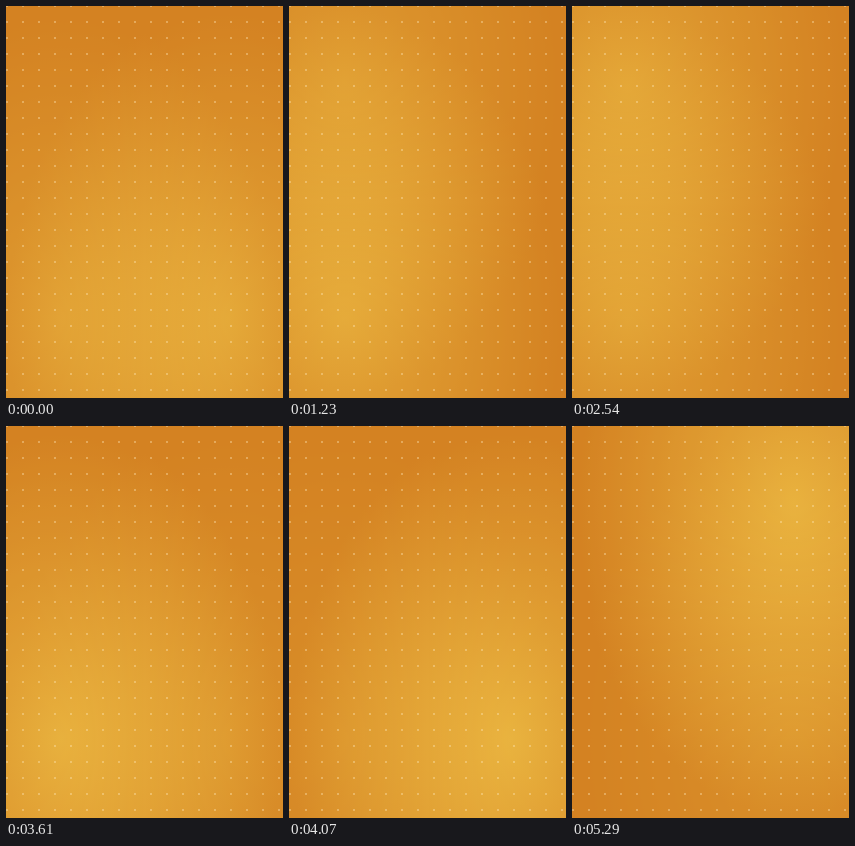
Animation, 277 px wide and 392 px high, one loop 5650 ms. Source, as an HTML page with a canvas:

```html
<!DOCTYPE html>
<html lang="en">
<head>
<meta charset="utf-8">
<title>Amber glow</title>
<style>
  html, body { margin: 0; width: 100%; height: 100%; overflow: hidden; background: #d48222; }
  canvas { display: block; width: 100%; height: 100%; }
</style>
</head>
<body>
<canvas id="stage" width="277" height="392"></canvas>
<script>
const W = 277, H = 392;
const LOOP = 5650, STEP = 1250, LEAD = 560;
const INNER = '#eebd45', OUTER = '#d48222';
const GRID = 16;

const ctx = document.getElementById('stage').getContext('2d');

const layer = paint => {
  const c = document.createElement('canvas');
  c.width = W;
  c.height = H;
  paint(c.getContext('2d'));
  return c;
};

// Elliptical glow that reaches the farthest corner, centred at a fraction of the stage
const glow = (fx, fy) => layer(g => {
  const rx = Math.SQRT2 * W * Math.max(fx, 1 - fx);
  const ry = Math.SQRT2 * H * Math.max(fy, 1 - fy);
  const fill = g.createRadialGradient(0, 0, 0, 0, 0, 1);
  fill.addColorStop(0, INNER);
  fill.addColorStop(0.7, OUTER);
  g.translate(fx * W, fy * H);
  g.scale(rx, ry);
  g.fillStyle = fill;
  g.fillRect(-2, -2, 4, 4);
});

const dots = layer(g => {
  g.fillStyle = 'rgba(255, 236, 190, 0.5)';
  for (let y = 0; y < H; y += GRID) {
    for (let x = 1; x < W; x += GRID) {
      g.beginPath();
      g.arc(x, y, 1, 0, Math.PI * 2);
      g.fill();
    }
  }
});

const topLeft = glow(0.2, 0.2), topRight = glow(0.8, 0.2);
const lowLeft = glow(0.2, 0.8), lowRight = glow(0.8, 0.8);
const path = [lowRight, lowLeft, topLeft, lowLeft, lowRight, topRight];

const easeInOut = p => p * p * (3 - 2 * p);

function draw(ms) {
  const pos = (ms % LOOP + LEAD) / STEP;
  const i = Math.floor(pos);
  ctx.globalAlpha = 1;
  ctx.drawImage(path[i], 0, 0);
  ctx.globalAlpha = easeInOut(pos - i);
  ctx.drawImage(path[i + 1], 0, 0);
  ctx.globalAlpha = 1;
  ctx.drawImage(dots, 0, 0);
}

const start = performance.now();
function tick() {
  draw(performance.now() - start);
  requestAnimationFrame(tick);
}
tick();
</script>
</body>
</html>
```
